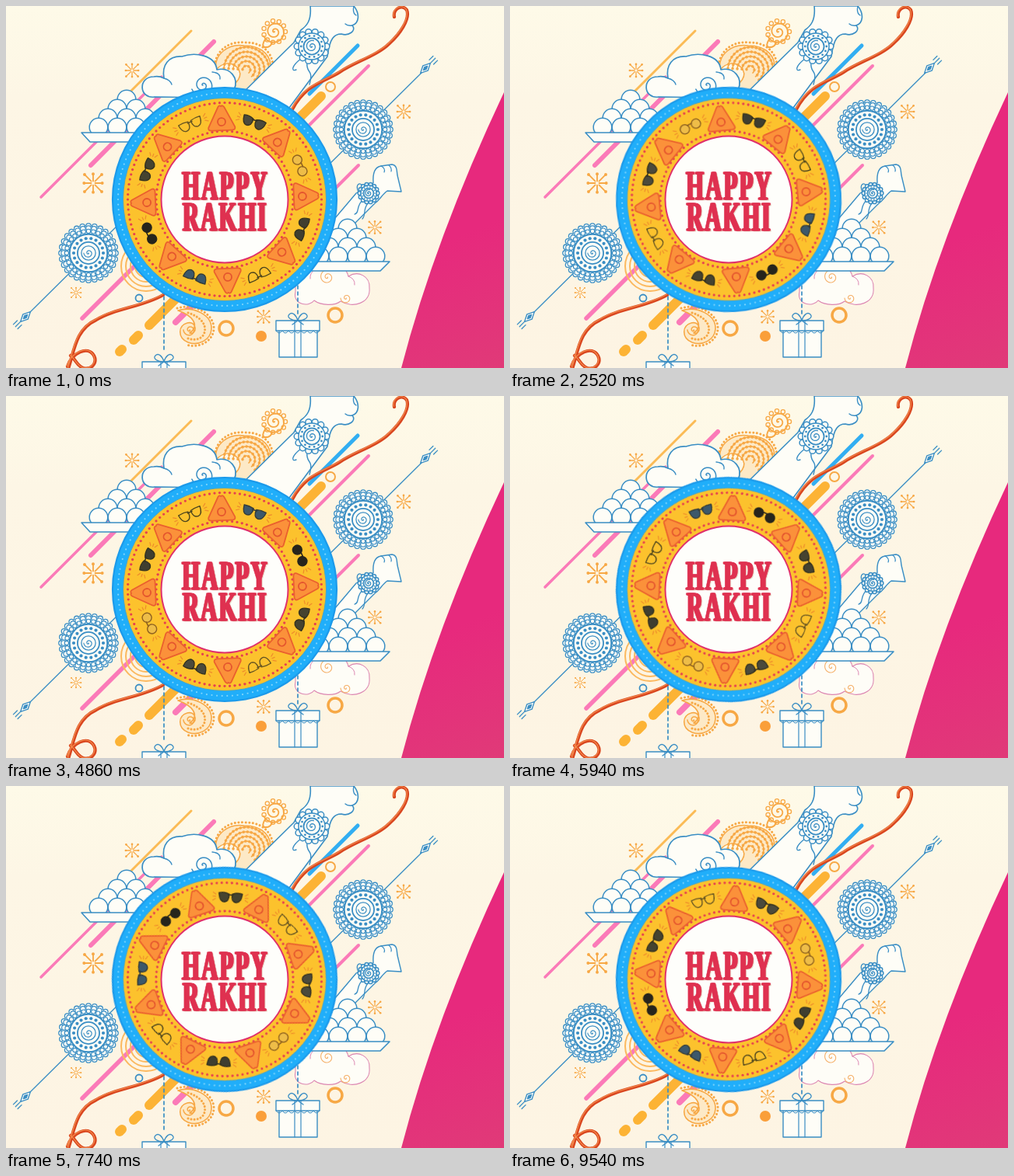
An HTML page with a canvas that plays this animation: 640 by 466 pixels, repeating every 9720 ms.

```html
<!DOCTYPE html>
<html lang="en">
<head>
<meta charset="utf-8">
<title>Happy Rakhi</title>
<style>
html, body { margin: 0; width: 100%; height: 100%; overflow: hidden; background: #fdf5e4; }
canvas { display: block; width: 640px; height: 466px; }
</style>
</head>
<body>
<canvas id="stage" width="640" height="466"></canvas>
<script>
const TAU = Math.PI * 2;
const BLUE = '#3a8ec4', ORANGE = '#f7a845', PINK = '#fb7ab8', RED = '#d9461f', WHITE = '#fefdf7', CRIMSON = '#df3150';
const stage = document.getElementById('stage').getContext('2d');
let ctx;

function layer(paint) {
  const canvas = document.createElement('canvas');
  canvas.width = 640;
  canvas.height = 466;
  ctx = canvas.getContext('2d');
  ctx.lineCap = ctx.lineJoin = 'round';
  paint();
  return canvas;
}

function shape(d, stroke, width = 1.5, fill) {
  const path = typeof d === 'string' ? new Path2D(d) : d;
  if (fill) { ctx.fillStyle = fill; ctx.fill(path); }
  if (stroke) { ctx.strokeStyle = stroke; ctx.lineWidth = width; ctx.stroke(path); }
}

function circle(x, y, r, stroke, width, fill) {
  const path = new Path2D();
  path.arc(x, y, r, 0, TAU);
  shape(path, stroke, width, fill);
}

const line = (x1, y1, x2, y2, color, width) => shape(`M${x1} ${y1}L${x2} ${y2}`, color, width);

function dashed(d, color, width, pattern) {
  ctx.setLineDash(pattern);
  shape(d, color, width);
  ctx.setLineDash([]);
}

function around(count, paint) {
  for (let i = 0; i < count; i++) paint(i * TAU / count, i);
}

function ring(x, y, radius, count, r, stroke, width, fill) {
  around(count, a => circle(x + radius * Math.cos(a), y + radius * Math.sin(a), r, stroke, width, fill));
}

function spiral(x, y, r, turns, color, width, start = 0) {
  const path = new Path2D();
  for (let i = 0; i <= 60; i++) {
    const k = i / 60, a = start + k * turns * TAU;
    path.lineTo(x + r * k * Math.cos(a), y + r * k * Math.sin(a));
  }
  shape(path, color, width);
}

function star(x, y, r) {
  around(8, (a, i) => {
    const k = i % 2 ? r * 1.2 : r * .9, dx = Math.cos(a) * k, dy = Math.sin(a) * k;
    line(x + dx * .22, y + dy * .22, x + dx, y + dy, ORANGE, r * .14);
    circle(x + dx, y + dy, r * .15, null, 0, ORANGE);
  });
}

function medallion(x, y, r) {
  ring(x, y, r * .92, 28, r * .085, BLUE, 1.3, WHITE);
  circle(x, y, r * .91, null, 0, WHITE);
  ring(x, y, r * .84, 28, r * .085, BLUE, 1.2, WHITE);
  ring(x, y, r * .74, 28, r * .07, BLUE, 1.1, WHITE);
  circle(x, y, r * .64, BLUE, 2, WHITE);
  ring(x, y, r * .5, 18, r * .055, null, 0, BLUE);
  circle(x, y, r * .37, BLUE, 1.8);
  circle(x, y, r * .24, BLUE, 1.3);
  spiral(x, y, r * .16, 1.5, BLUE, 1.2);
}

function bracelet(x, y, r) {
  ring(x, y, r * .82, 14, r * .17, BLUE, 1.5, WHITE);
  circle(x, y, r * .74, BLUE, 1.5, WHITE);
  ring(x, y, r * .6, 14, r * .06, null, 0, BLUE);
  circle(x, y, r * .46, BLUE, 1.8);
  spiral(x, y, r * .34, 1.8, BLUE, 1.3);
}

function sweets(x, y) {
  for (let row = 0; row < 4; row++)
    for (let i = 0; i <= row; i++)
      circle(x + (i - row / 2) * 24, y + row * 12, 11.8, BLUE, 1.5, WHITE);
  shape(`M${x - 58} ${y + 43}h112l-12 12h-89z`, BLUE, 1.6, WHITE);
}

function gift(x, y) {
  shape(`M${x - 24} ${y + 12}h49v35h-49z`, BLUE, 1.4, WHITE);
  shape(`M${x - 28} ${y}h56v13h-56z`, BLUE, 1.4, WHITE);
  shape(`M${x - 28} ${y + 13}` + 'q4 6 8 0'.repeat(7), BLUE, 1);
  shape(`M${x - 4} ${y}v47M${x + 4} ${y}v47`, BLUE, 1.2);
  shape(`M${x} ${y}c-8 0-15-4-11-8s9 1 11 8c2-7 7-12 11-8s-3 8-11 8M${x} ${y}l-7 5M${x} ${y}l7 5`, BLUE, 1.3);
}

// Charm at the end of a thread, drawn along the thread's direction.
function charm(x, y, angle) {
  ctx.save();
  ctx.translate(x, y);
  ctx.rotate(angle);
  shape('M-9 0L0-4.5 9 0 0 4.5z', BLUE, 1.4, WHITE);
  shape('M-4 0L0-2 4 0 0 2z', BLUE, 1, BLUE);
  shape('M9 0h9M11-4h7M11 4h7', BLUE, 1.3);
  ctx.restore();
}

function ribbon(d) {
  shape(d, RED, 4.2);
  ctx.save();
  ctx.translate(-.7, -.7);
  shape(d, '#f2884a', 1.3);
  ctx.restore();
}

function diagonals() {
  line(238, 32, 145, 125, '#fbbb55', 3);
  line(45, 246, 200, 91, PINK, 3.5);
  line(109, 205, 267, 46, PINK, 6);
  line(452, 51, 390, 113, '#32aef2', 5);
  line(466, 77, 385, 158, PINK, 4);
  line(453, 205, 405, 253, PINK, 4);
  line(98, 402, 170, 330, PINK, 5.5);
  line(218, 407, 245, 380, PINK, 8);
  line(405, 116, 370, 151, '#fcb335', 12);
  line(146, 445, 149, 442, '#fcb335', 12);
  line(164, 430, 170, 424, '#fcb335', 12);
  line(184, 411, 222, 373, '#fcb335', 12);
  circle(417, 104, 6, ORANGE, 2);
  circle(283, 415, 9, ORANGE, 3.5);
  circle(423, 398, 9, ORANGE, 3.5);
  circle(328, 425, 7, null, 0, '#fa9f3a');
  circle(171, 376, 4.5, BLUE, 1.8);
  for (let r = 8; r <= 32; r += 6) circle(180, 335, r, '#fbb95f', 2);
}

function paisleys() {
  shape('M270 82C267 61 287 48 306 51C331 51 342 66 340 82C338 98 321 104 308 112L280 108C298 101 306 89 297 79C289 71 278 73 270 82Z', ORANGE, 1.5, '#fde9c6');
  for (let r = 5; r <= 29; r += 6) {
    const path = new Path2D();
    path.arc(309, 82, r, Math.PI * 1.02, TAU * 1.15);
    shape(path, ORANGE, 1.6);
    dashed(path, ORANGE, 3.5, [.1, 5]);
  }
  dashed('M268 76C271 56 287 45 307 47C334 46 347 67 342 86', ORANGE, 3, [.1, 4.5]);

  spiral(345, 33, 15, 2.2, ORANGE, 1.8, 1.5);
  ring(345, 33, 14, 11, 2.6, ORANGE, 1.3);
  shape('M333 43q-5 8-1 10q8 1 10-6', ORANGE, 2);

  shape('M221 392C240 386 265 397 264 416C263 430 247 438 234 433C220 427 221 411 233 408C246 405 246 424 236 421C250 411 239 398 221 392Z', ORANGE, 1.6, '#fde9c6');
  dashed('M220 389C243 382 269 397 267 417C265 433 246 441 232 436', ORANGE, 3, [.1, 4.5]);
  dashed('M234 395C253 401 259 413 254 423C250 430 239 431 232 427', ORANGE, 3, [.1, 4]);
  spiral(236, 417, 8, 1.5, ORANGE, 1.5);
}

function clouds() {
  shape('M191 117C171 120 169 91 190 91C195 90 199 91 203 93C200 76 209 64 226 65C243 59 269 63 271 82C288 78 300 93 293 108C284 119 271 119 264 118Z', BLUE, 1.7, WHITE);
  spiral(253, 102, 15, 2, BLUE, 1.5, 2.8);
  shape('M203 93q8 2 10 8M265 85q11 1 10 9', BLUE, 1.4);

  shape('M372 368C368 385 390 388 396 379C405 386 423 386 430 380C446 390 469 382 467 363C468 348 453 340 440 348C436 329 407 324 397 339C385 333 374 342 372 352Z', '#dc86b2', 1.1, WHITE);
  spiral(413, 349, 10, 1.8, '#f5b06a', 1.1);
  spiral(437, 376, 7, 1.5, '#f5b06a', 1.1);
  shape('M397 339q-7 5-6 12M440 348q9 3 8 11', '#dc86b2', 1);
}

function arms() {
  shape('M300 116L370 47L379 31C386 26 393 19 391 0H447C455 10 454 22 445 25C451 32 440 39 431 36C422 36 416 41 413 65L364 131Z', BLUE, 1.6, WHITE);
  shape('M447 0q-2 9 3 12M445 25q-6 1-9-2', BLUE, 1.4);
  shape('M379 68C367 77 366 85 373 82M387 72C385 88 396 80 390 101', BLUE, 1.4);
  bracelet(393, 52, 23);

  shape('M412 286L450 241L472 228C471 214 475 207 482 206L496 204C503 205 502 212 503 218L508 239L490 238C484 242 480 250 474 254L436 292Z', BLUE, 1.4, WHITE);
  shape('M482 206q6 3 4 8M492 205q4 3 3 8', BLUE, 1.2);
  shape('M453 240C448 228 456 226 459 233M459 249C449 258 455 266 448 268M465 254C458 263 463 269 458 274', BLUE, 1.3);
  bracelet(466, 241, 14);
}

function scenery() {
  const sky = ctx.createLinearGradient(0, 0, 0, 466);
  sky.addColorStop(0, '#fefae8');
  sky.addColorStop(.25, '#fdf6e5');
  sky.addColorStop(1, '#fdf4e3');
  ctx.fillStyle = sky;
  ctx.fillRect(0, 0, 640, 466);
  const panel = ctx.createLinearGradient(570, 300, 640, 466);
  panel.addColorStop(0, '#e7297d');
  panel.addColorStop(1, '#e03a78');
  shape('M640 111Q551 300 508 466H640Z', null, 0, panel);

  diagonals();
  paisleys();
  arms();
  clouds();
  sweets(155, 120);
  sweets(439, 286);

  line(535, 85, 400, 219, BLUE, 1.3);
  line(30, 395, 160, 266, BLUE, 1.3);
  medallion(459, 159, 38);
  medallion(106, 318, 38);
  charm(539, 80, -TAU / 8);
  charm(25, 400, TAU * 3 / 8);

  ribbon('M499 14C497 4 509-3 515 5C520 17 505 37 493 48C477 64 448 72 429 85C409 98 385 100 368 133');
  ribbon('M202 372C174 388 140 389 116 404C88 417 88 445 79 470M79 464C85 446 105 437 113 450C118 460 109 469 99 466C91 463 89 454 83 450');

  star(162, 83, 9);
  star(112, 228, 13);
  star(511, 136, 9);
  star(474, 285, 8.5);
  star(90, 369, 7);
  star(331, 400, 8.5);

  dashed('M203 374V446', BLUE, 1.7, [4, 4]);
  dashed('M375 360V396', BLUE, 1.7, [4, 4]);
  gift(203, 458);
  gift(375, 405);
}

// Each pair of glasses is drawn upright around its own middle.
const LENSES = {
  shade: 'M-15-5Q-8-7-2-4Q-1 6-8 6.5Q-14 6-15-5ZM15-5Q8-7 2-4Q1 6 8 6.5Q14 6 15-5Z',
  square: 'M-15-5Q-8-6-2-4.5Q-1 5.5-8 6Q-14 6-15-5ZM15-5Q8-6 2-4.5Q1 5.5 8 6Q14 6 15-5Z',
  round: 'M-14 0a6 6 0 1 0 12 0a6 6 0 1 0-12 0M2 0a6 6 0 1 0 12 0a6 6 0 1 0-12 0'
};
const DARK = '#35321f';
const GLASSES = [
  ['shade', DARK, '#4b4a3c'], ['round', '#8f6220', '#eebd48'], ['shade', DARK, '#3f3e30'], ['square', '#4a431d'],
  ['square', '#343c39', '#3c586b'], ['round', '#27251c', '#27251c'], ['shade', DARK, '#454330'], ['square', '#655422']
];

function glasses([style, frame, lens]) {
  shape(LENSES[style], frame, 1.4, lens);
  line(-3, -3, 3, -3, frame, 1.6);
  for (const side of [-1, 1])
    for (const y of [-4, 0, 4]) line(side * 19, y * .7, side * 22.5, y * 1.3, '#ee8b2c', 1.2);
}

function samosa() {
  shape('M0-16Q2-18 4-15L17 11Q18 15 13 15H-13Q-18 15-17 11L-4-15Q-2-18 0-16Z', '#ea602e', 1.8, '#fb913a');
  circle(0, 4, 5, '#e4552e', 1.8);
}

function wheel() {
  ctx.translate(320, 233);
  circle(0, 0, 144, '#1c9aea', 2.2, '#20aefa');
  ring(0, 0, 137, 130, 1.1, null, 0, '#80d5fb');
  circle(0, 0, 130.5, '#4aa4c4', 1, '#fcc22d');
  ring(0, 0, 124.5, 120, 1.6, null, 0, '#e6404f');
  ring(0, 0, 88, 86, 1.6, null, 0, '#e6404f');
  const place = (angle, radius, paint) => {
    ctx.save();
    ctx.rotate(angle);
    ctx.translate(0, -radius);
    paint();
    ctx.restore();
  };
  around(8, (a, i) => {
    place(a - 2.3 * TAU / 360, 104, samosa);
    place(a + 20.7 * TAU / 360, 106, () => glasses(GLASSES[i]));
  });
}

function title() {
  circle(281, 249, 81.5, '#e0306c', 2, '#fefefb');
  ctx.font = 'bold 53px "Liberation Serif", "Times New Roman", serif';
  ctx.letterSpacing = '4px';
  ctx.textAlign = 'center';
  ctx.lineJoin = 'miter';
  const print = (text, x, y, color) => {
    ctx.save();
    ctx.translate(x, y);
    ctx.scale(.55, 1); // condensed poster lettering
    ctx.fillStyle = ctx.strokeStyle = color;
    ctx.lineWidth = 1;
    ctx.fillText(text, 0, 0);
    ctx.strokeText(text, 0, 0);
    ctx.restore();
  };
  for (const [text, y] of [['HAPPY', 248.5], ['RAKHI', 288.5]]) {
    print(text, 284, y + 1.4, '#e9dfce');
    for (const dx of [-1, 0, 1]) print(text, 282 + dx, y, CRIMSON);
  }
}

const sceneryLayer = layer(scenery), wheelLayer = layer(wheel), titleLayer = layer(title);

const LOOP = 9720, STEP = 90, LAST_STEP = 106;
function render() {
  const step = Math.min(LAST_STEP, Math.floor(performance.now() % LOOP / STEP));
  stage.drawImage(sceneryLayer, 0, 0);
  stage.save();
  stage.translate(281, 249);
  stage.rotate(-step * STEP / LOOP * TAU);
  stage.drawImage(wheelLayer, -320, -233);
  stage.restore();
  stage.drawImage(titleLayer, 0, 0);
  requestAnimationFrame(render);
}
render();
</script>
</body>
</html>
```
